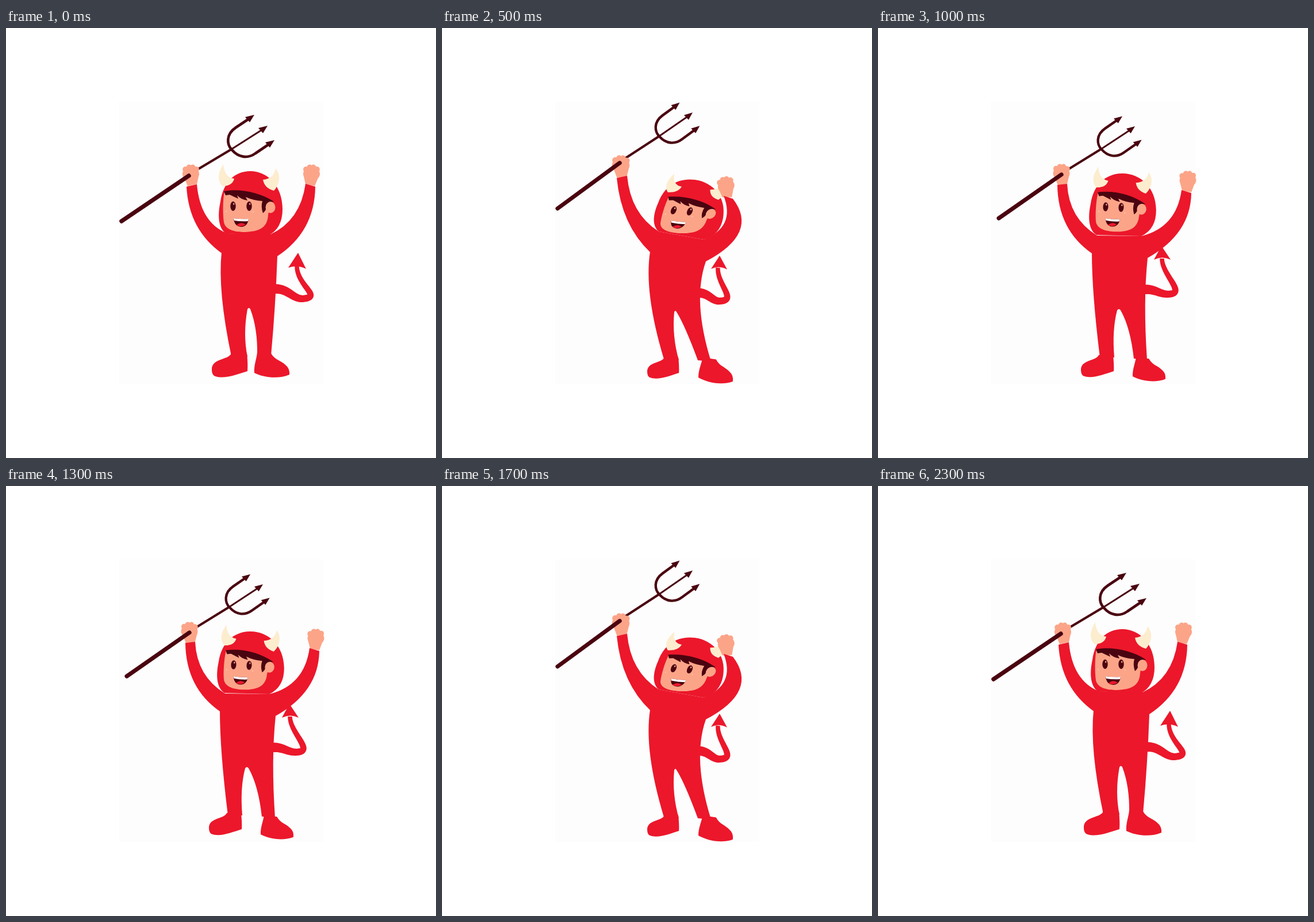
These frames come from a looping animation (748 by 748 pixels, 2400 ms). An HTML page with a canvas:

```html
<!DOCTYPE html>
<html lang="en">
<head>
<meta charset="utf-8">
<title>Cheering devil</title>
<style>
html, body { margin: 0; width: 100%; height: 100%; overflow: hidden; background: #fff; }
canvas { display: block; width: 748px; height: 748px; }
</style>
</head>
<body>
<canvas id="stage" width="748" height="748"></canvas>
<script>
const ctx = document.getElementById('stage').getContext('2d');
const RED = '#ec172b', DARK = '#4a0410', SKIN = '#fca488', HORN = '#fdedcf';

// Key poses sit at these steps; the steps between are blended.
const KEYS = [0, 1, 3, 5];

// Limb edges: start, control, end.
const armL = {
  inner: [[332,272, 338,338, 384,357], [329,271, 332,331, 381,361], [325,264, 331,330, 378,356], [322,257, 328,323, 377,354]],
  outer: [[377,393, 318,352, 314,276], [372,392, 313,351, 312,273], [366,394, 309,345, 308,267], [363,391, 312,343, 304,261]]
};
const armR = {
  inner: [[521,271, 512,335, 460,359], [528,282, 519,347, 458,362], [520,289, 520,352, 455,367], [490,292, 511,346, 455,368]],
  outer: [[472,397, 537,354, 538,276], [469,400, 544,358, 545,287], [465,405, 546,364, 538,294], [459,406, 552,357, 506,297]]
};
const legL = {
  outer: [[375,390, 368,457, 392,571], [372,390, 372,460, 386,573], [366,391, 359,464, 383,574], [362,389, 351,460, 386,576]],
  inner: [[420,572, 412,533, 420,489], [411,573, 407,525, 416,491], [409,575, 401,531, 409,494], [412,578, 400,536, 404,494]]
};
const legR = {
  inner: [[425,489, 438,523, 437,570], [422,491, 439,521, 445,575], [415,494, 434,525, 448,578], [408,494, 422,516, 445,578]],
  outer: [[461,570, 469,482, 472,397], [468,577, 461,476, 469,400], [471,580, 447,470, 465,405], [468,580, 435,474, 459,406]]
};

// Tail: a centre line of two cubic curves, and an arrow.
const tail = [
  [466,454, 490,452, 498,471, 516,471, 552,468, 506,448, 506,414],
  [461,455, 482,453, 488,463, 505,463, 538,462, 494,430, 494,401],
  [452,460, 472,458, 478,468, 490,467, 525,466, 478,430, 483,400],
  [443,461, 463,459, 470,476, 483,475, 515,474, 478,446, 480,417]
];
const tailTip = [
  [508,391, 522,419, 491,417], [493,379, 509,403, 480,403],
  [487,379, 498,403, 468,400], [483,396, 496,420, 468,419]
];

// Anchors that place the rigid parts, which are drawn in the first pose.
const hoodAt = [
  [382,357, 425,249, 456,361], [380,360, 424,253, 458,362],
  [376,353, 434,258, 455,367], [377,354, 440,264, 455,368]
];
const faceAt = [
  [395,310, 423,310, 409,338], [396,311, 423,312, 408,338],
  [399,314, 427,315, 409,341], [403,317, 431,319, 410,342]
];
const tridentAt = [[201,336, 455,170], [210,331, 447,171], [205,324, 444,160], [201,314, 436,147]];
const handLAt = [[324,273, 322,238], [321,272, 320,237], [316,266, 316,231], [313,259, 312,222]];
const handRAt = [[529,273, 532,237], [537,284, 539,248], [527,291, 525,254], [496,294, 491,258]];
const footLAt = [[421,597, 358,593], [411,597, 353,594], [409,599, 352,596], [413,600, 357,597]];
const footRAt = [[432,600, 493,600], [443,606, 500,608], [447,609, 506,612], [446,608, 506,612]];

const hood = new Path2D('M382 357C366 345 370 316 373 302C378 268 398 249 425 249C455 249 481 275 481 315Q481 349 456 361Z');
const footL = new Path2D('M392 566C387 578 358 574 358 594Q358 602 362 605C378 612 400 603 420 597Q421 584 419 566Z');
const footR = new Path2D('M437 564C436 576 431 586 432 600C446 607 472 612 493 603Q494 592 486 586C478 578 468 578 461 566Z');
const face = new Path2D('M380 284C377 300 377 325 379 338C382 352 400 355 415 355C440 354 455 348 456 325L460 300Z');
const hair = new Path2D('M379 284C405 279 440 285 466 302Q456 303 453 313Q451 319 447 322Q443 311 446 301Q430 300 417 294L420 300Q408 298 402 291L404 297L389 290L382 291Z');
const hornL = new Path2D('M378 237C370 250 366 263 376 275Q394 275 397 262Q380 260 378 237Z');
const hornR = new Path2D('M469 244Q466 262 447 264Q450 279 466 283C476 272 479 256 469 244Z');
const mouth = new Path2D('M396 331Q409 333 422 332C421 341 416 346 409 346Q397 345 396 331Z');
const teeth = new Path2D('M396 331Q409 333 422 332L421 336Q409 337 397 335Z');
const tongue = new Path2D('M401 343Q409 336 417 342Q409 348 401 343Z');
const prongs = new Path2D('M427 155L400 173C382 185 384 203 393 212C404 225 420 228 434 218L462 199');

function blend(keys, step) {
  let i = 0;
  while (i < KEYS.length - 2 && step > KEYS[i + 1]) i++;
  const u = (step - KEYS[i]) / (KEYS[i + 1] - KEYS[i]);
  return keys[i].map((v, n) => v + (keys[i + 1][n] - v) * u);
}

function fill(path, color) {
  ctx.fillStyle = color;
  ctx.fill(path);
}

function edge(path, [x, y, cx, cy, ex, ey]) {
  path.lineTo(x, y);
  path.quadraticCurveTo(cx, cy, ex, ey);
}

function oval(x, y, rx, ry, color) {
  ctx.beginPath();
  ctx.ellipse(x, y, rx, ry, 0, 0, Math.PI * 2);
  ctx.fillStyle = color;
  ctx.fill();
}

function line(color, width, ...p) {
  ctx.strokeStyle = color;
  ctx.lineWidth = width;
  ctx.lineCap = 'round';
  ctx.beginPath();
  for (let i = 0; i < p.length; i += 2) ctx.lineTo(p[i], p[i + 1]);
  ctx.stroke();
}

// Two anchors get a third one at a right angle.
function triple(p) {
  return p.length > 4 ? p : [...p, p[0] - (p[3] - p[1]), p[1] + (p[2] - p[0])];
}

function place(keys, step, draw) {
  const a = triple(keys[0]), b = triple(blend(keys, step));
  const ux = a[2] - a[0], uy = a[3] - a[1], vx = a[4] - a[0], vy = a[5] - a[1];
  const d = ux * vy - uy * vx;
  const row = n => {
    const p = b[n + 2] - b[n], q = b[n + 4] - b[n];
    const sx = (p * vy - q * uy) / d, sy = (q * ux - p * vx) / d;
    return [sx, sy, b[n] - sx * a[0] - sy * a[1]];
  };
  const x = row(0), y = row(1);
  ctx.save();
  ctx.transform(x[0], y[0], x[1], y[1], x[2], y[2]);
  draw();
  ctx.restore();
}

function cubic(p, i, t) {
  const s = 1 - t;
  return s * s * s * p[i] + 3 * s * s * t * p[i + 2] + 3 * s * t * t * p[i + 4] + t * t * t * p[i + 6];
}

function drawTail(step) {
  const p = blend(tail, step), n = 60, left = [], right = [];
  for (let k = 0; k <= n; k++) {
    const u = k / n, i = u < 0.5 ? 0 : 6, t = u * 2 - i / 6;
    const x = cubic(p, i, t), y = cubic(p, i + 1, t);
    const dx = cubic(p, i, t + 0.01) - x, dy = cubic(p, i + 1, t + 0.01) - y;
    const r = (8.5 - 4.8 * u) / Math.hypot(dx, dy);
    left.push([x + dy * r, y - dx * r]);
    right.unshift([x - dy * r, y + dx * r]);
  }
  const body = new Path2D();
  for (const [x, y] of left.concat(right)) body.lineTo(x, y);
  fill(body, RED);

  const [x, y, rx, ry, lx, ly] = blend(tailTip, step);
  const tip = new Path2D();
  tip.moveTo(x, y);
  edge(tip, [rx, ry, (lx + rx) / 2, (ly + ry) / 2 - 7, lx, ly]);
  fill(tip, RED);
}

function drawBody(step) {
  const path = new Path2D();
  const left = blend(legL.inner, step), right = blend(legR.inner, step);
  edge(path, blend(legL.outer, step));
  edge(path, left);
  path.quadraticCurveTo((left[4] + right[0]) / 2, left[5] - 4, right[0], right[1]);
  edge(path, right);
  edge(path, blend(legR.outer, step));
  path.lineTo(...blend(armR.inner, step).slice(4));
  path.lineTo(...blend(armL.inner, step).slice(4));
  fill(path, RED);
}

function drawArm(arm, step) {
  const path = new Path2D();
  const inner = blend(arm.inner, step), outer = blend(arm.outer, step);
  edge(path, inner);
  path.lineTo((inner[4] + outer[0]) / 2 + (arm === armL ? 10 : -14), (inner[5] + outer[1]) / 2);
  edge(path, outer);
  fill(path, RED);
}

function drawHand() {
  const wrist = new Path2D('M316 275L332 272L335 258L309 258Z');
  fill(wrist, SKIN);
  oval(321.5, 254, 14.5, 11.5, SKIN);
  for (let k = 0; k < 4; k++) oval(312 + k * 6.4, k % 3 ? 242.5 : 246, 4.8, 5, SKIN);
}

function drawHandR() {
  ctx.translate(853, 0);
  ctx.scale(-1, 1);
  drawHand();
}

function drawHead() {
  fill(face, SKIN);
  fill(hair, DARK);
  oval(460, 312, 8.5, 10, SKIN);
  for (const x of [395, 423]) {
    oval(x, 310, 4.7, 8.3, DARK);
    oval(x + 1.2, 306, 1.2, 1.8, SKIN);
  }
  oval(383, 319, 1, 1, '#ffd2c0');
  oval(430, 320, 1, 1, '#ffd2c0');
  fill(mouth, DARK);
  fill(tongue, RED);
  fill(teeth, '#fff');
  fill(hornL, HORN);
  fill(hornR, HORN);
}

function drawTrident() {
  ctx.strokeStyle = DARK;
  ctx.lineWidth = 4.6;
  ctx.stroke(prongs);
  line(DARK, 4.2, 320, 254, 392, 211);
  line(DARK, 3, 392, 211, 447, 176);
  for (const [x, y] of [[432, 151], [455, 170], [467, 195]]) {
    const head = new Path2D();
    head.moveTo(x, y);
    head.lineTo(x - 16, y + 4);
    head.lineTo(x - 8, y + 13);
    fill(head, DARK);
  }
}

function draw(step) {
  ctx.fillStyle = '#fff';
  ctx.fillRect(0, 0, 748, 748);
  ctx.fillStyle = '#fdfdfd';
  ctx.fillRect(197, 128, 355, 491);
  drawTail(step);
  place(footLAt, step, () => fill(footL, RED));
  place(footRAt, step, () => fill(footR, RED));
  drawBody(step);
  place(hoodAt, step, () => fill(hood, RED));
  place(faceAt, step, drawHead);
  place(tridentAt, step, drawTrident);
  place(handLAt, step, drawHand);
  place(handRAt, step, drawHandR);
  drawArm(armL, step);
  drawArm(armR, step);
  place(tridentAt, step, () => line(DARK, 7.5, 201, 336, 318, 257));
}

// Six steps out, six steps back, 100 ms each.
const start = performance.now();
function tick() {
  const i = Math.floor(Math.max(0, performance.now() - start) / 100) % 12;
  draw(i < 6 ? i : 11 - i);
  requestAnimationFrame(tick);
}
tick();
</script>
</body>
</html>
```
